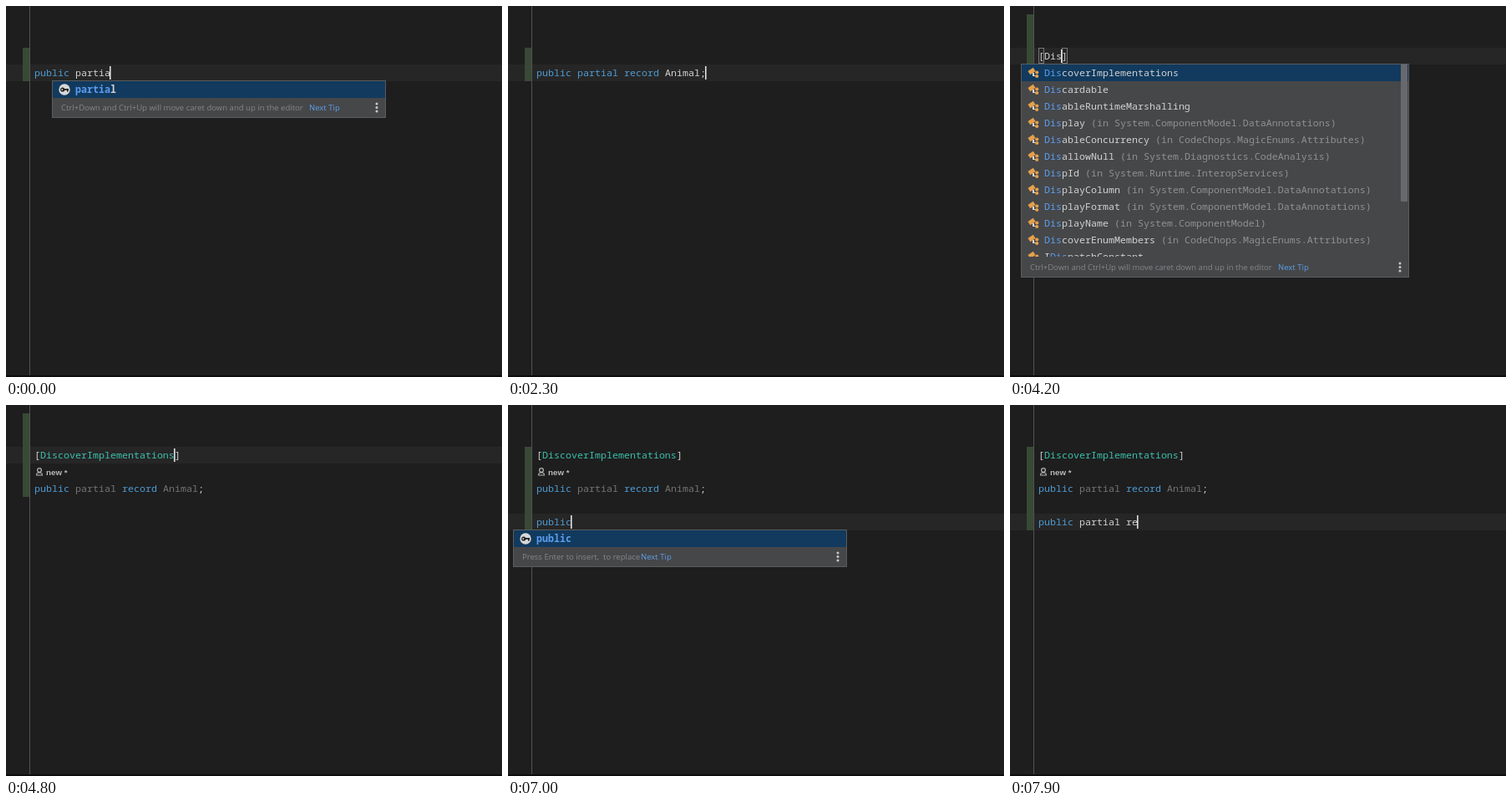
These frames come from a looping animation (594x444 px, 8 s). An HTML page with a canvas:

```html
<!DOCTYPE html>
<html lang="en">
<head>
<meta charset="utf-8">
<title>Code editor</title>
<style>
html, body { margin: 0; width: 100%; height: 100%; overflow: hidden; background: #1e1e1e; }
canvas { display: block; width: 594px; height: 444px; }
</style>
</head>
<body>
<canvas id="stage"></canvas>
<script>
const W = 594, H = 444, LOOP = 8000, LEFT = 34, CHAR = 7;
const BLUE = '#4e9bd3', WHITE = '#d2d2d2', GREY = '#747474', TEAL = '#3cc0ac', MATCH = '#5c9df0', PANEL = '#464749';
const MONO = '11.667px "Noto Sans Mono", "DejaVu Sans Mono", monospace';
const UI = '9.56px "Open Sans", "Noto Sans", sans-serif';
const MOVE_TIP = 'Ctrl+Down and Ctrl+Up will move caret down and up in the editor';
const INSERT_TIP = 'Press Enter to insert,  to replace';
const DECLARATION = [['public ', 6], ['partial ', 21], ['record ', 21], ['Animal', 99], [';', 99]];
const ATTRIBUTES = [
  'DiscoverImplementations', 'Discardable', 'DisableRuntimeMarshalling',
  'Display (in System.ComponentModel.DataAnnotations)',
  'DisableConcurrency (in CodeChops.MagicEnums.Attributes)',
  'DisallowNull (in System.Diagnostics.CodeAnalysis)',
  'DispId (in System.Runtime.InteropServices)',
  'DisplayColumn (in System.ComponentModel.DataAnnotations)',
  'DisplayFormat (in System.ComponentModel.DataAnnotations)',
  'DisplayName (in System.ComponentModel)',
  'DiscoverEnumMembers (in CodeChops.MagicEnums.Attributes)',
  'IDispatchConstant'
];

const canvas = document.getElementById('stage');
const g = canvas.getContext('2d');
const scale = window.devicePixelRatio || 1;
canvas.width = W * scale;
canvas.height = H * scale;
g.scale(scale, scale);

const colX = col => LEFT + col * CHAR;

function rect(x, y, w, h, color) {
  g.fillStyle = color;
  g.fillRect(x, y, w, h);
}

function text(str, x, y, color, font = MONO) {
  g.font = font;
  g.fillStyle = color;
  g.fillText(str, x, y);
}

function disc(x, y, r, color) {
  g.fillStyle = color;
  g.beginPath();
  g.arc(x, y, r, 0, 7);
  g.fill();
}

// Value of the last [time, value] step reached
function at(t, steps) {
  let value = steps[0][1];
  for (const [time, next] of steps) if (t >= time) value = next;
  return value;
}

function declaration(top, n, unused) {
  let col = 0;
  for (const [word, keywordAt] of DECLARATION) {
    const dim = unused && /partial|Animal/.test(word);
    const color = dim ? GREY : n >= keywordAt ? BLUE : WHITE;
    text(word.slice(0, Math.max(0, n - col)), colX(col), top + 14, color);
    col += word.length;
  }
}

function bracketBox(col, top) {
  g.strokeStyle = '#777';
  g.lineWidth = 1;
  g.strokeRect(colX(col) + .5, top + .5, CHAR - 1, 18);
}

function authorLens(top) {
  g.strokeStyle = '#b4b4b4';
  g.lineWidth = 1.2;
  g.beginPath();
  g.arc(40, top + 8, 2.4, 0, 7);
  g.moveTo(36.5, top + 14);
  g.quadraticCurveTo(36.5, top + 11.5, 38.5, top + 11);
  g.lineTo(41.5, top + 11);
  g.quadraticCurveTo(43.5, top + 11.5, 43.5, top + 14);
  g.closePath();
  g.stroke();
  text('new *', 48, top + 13.5, '#b8b8b8', 'bold 9.8px "Liberation Sans", Arial, sans-serif');
}

function keyIcon(x, y) {
  disc(x, y, 6.7, '#d8d8d8');
  disc(x - 2.3, y, 2.6, '#222');
  disc(x - 2.8, y, .9, '#d8d8d8');
  rect(x, y - 1, 5, 1.8, '#222');
  rect(x + 3, y, 1.6, 2.6, '#222');
}

function classIcon(x, y) {
  g.save();
  g.translate(x - 2, y - 2);
  g.rotate(-.6);
  rect(-3.8, -2.5, 7.6, 5, '#e5a04c');
  g.restore();
  rect(x - 1, y, 2, 4, '#d8d8d8');
  rect(x, y + 3, 3, 1, '#d8d8d8');
  disc(x + 4.2, y - .5, 2.1, '#e5a04c');
  disc(x + 4.2, y + 4, 2.1, '#e5a04c');
}

function popup({ col, top, rows, match, tip = INSERT_TIP, width = 400, keyword = true }) {
  const x = colX(col) - 28;
  const listH = Math.min(rows.length * 20, 231);
  const height = listH + 25;
  const font = keyword ? 'bold ' + MONO : MONO;
  rect(x, top, width, height, '#5b5c5e');
  rect(x + 1, top + 1, width - 2, height - 2, PANEL);
  rect(x + 1, top + 1, width - 2, 20, '#113a5e');
  g.save();
  g.beginPath();
  g.rect(x, top, width, listH);
  g.clip();
  rows.forEach((row, i) => {
    const mid = top + 11 + i * 20;
    const from = row.startsWith('ID') ? 1 : 0;
    const space = row.indexOf(' ');
    const end = space < 0 ? row.length : space;
    (keyword ? keyIcon : classIcon)(x + 15, mid);
    const part = (a, b, color) => text(row.slice(a, b), x + 28 + a * CHAR, mid + 4, color, font);
    part(0, from, WHITE);
    part(from, from + match, MATCH);
    part(from + match, end, WHITE);
    part(end, row.length, '#909090');
  });
  if (listH > 200) rect(x + width - 10, top + 1, 8, 164, '#68696c');
  g.restore();
  const base = top + height - 9;
  text(tip, x + 11, base, '#858688', UI);
  text('Next Tip', x + (tip === MOVE_TIP ? 308 : 153), base, '#5c9fe8', UI);
  for (const dy of [17, 12.5, 8]) disc(x + width - 11, top + height - dy, 1.5, '#c8c8c8');
}

function attribute(t) {
  const typed = at(t, [[0, 0], [3700, 1], [3900, 2], [4000, 3], [4500, 23]]);
  const name = ATTRIBUTES[0].slice(0, typed);
  const call = t >= 4500 && t < 4700 ? '()' : '';
  text('[', colX(0), 64, WHITE);
  text(name, colX(1), 64, t >= 4700 ? TEAL : WHITE);
  text(call + ']', colX(1 + typed), 64, WHITE);
  if (t >= 3500 && t < 4500 || t >= 4900 && t < 5100) {
    bracketBox(0, 50);
    bracketBox(1 + typed, 50);
  }
  if (call) {
    bracketBox(24, 50);
    bracketBox(25, 50);
  }
  return typed;
}

function draw(t) {
  const n1 = t < 1200 ? Math.min(13 + Math.floor(t / 100), 23)
    : at(t, [[1200, 24], [1300, 25], [1700, 28], [2300, 29]]);
  const n2 = at(t, [[0, 0], [6400, 1], [6600, 2], [6700, 3], [6800, 4], [6900, 5], [7000, 6], [7200, 7],
    [7300, 8], [7400, 9], [7500, 11], [7600, 12], [7700, 14], [7800, 16], [7900, 17]]);
  const caretTop = at(t, [[0, 70], [2700, 90], [3000, 50], [5100, 90], [5700, 110], [5900, 130]]);
  const [greenTop, greenEnd] = at(t, [[0, [50, 90]], [2700, [50, 110]], [3400, [10, 110]],
    [5700, [10, 130]], [5900, [10, 150]], [6400, [50, 150]]]);

  rect(0, 0, W, H, '#1e1e1e');
  rect(0, caretTop, W, 20, '#262626');
  rect(20, greenTop, 8, greenEnd - greenTop, '#384a35');
  rect(28, 0, 1, 442, '#525252');
  rect(0, 442, W, 2, '#0c0c0c');

  const moved = t >= 2700;
  declaration(moved ? 90 : 70, n1, t >= 2500);
  if (moved) authorLens(70);
  const typed = t >= 3400 ? attribute(t) : 0;
  declaration(130, n2, false);

  if (t >= 1000 && t < 1200) {
    g.strokeStyle = '#b5523f';
    g.lineWidth = 1;
    g.beginPath();
    for (let i = 0; i < 5; i++) g.lineTo(181 + i * 1.75, i % 2 ? 85 : 87.5);
    g.stroke();
  }

  const caretCol = at(t, [[0, n1], [3000, 0], [3400, 1 + typed], [4500, 25], [4700, 24], [4900, 25],
    [5400, 29], [5700, 0], [6400, n2]]);
  rect(colX(caretCol) - (caretCol ? 1 : 0), caretTop + 2, 1.6, 16, '#e0e0e0');

  if (t < 200) popup({ col: 7, top: 89, rows: ['partial'], match: n1 - 7, tip: MOVE_TIP });
  else if (t >= 1100 && t < 1500)
    popup({ col: 22, top: 89, rows: ['Animal'], match: n1 - 22, keyword: false });
  else if (t >= 3800 && t < 4500)
    popup({ col: 1, top: 69, rows: ATTRIBUTES, match: typed, tip: MOVE_TIP, width: 465, keyword: false });
  else if (t >= 6500 && t < 6600)
    popup({ col: 0, top: 149, rows: ['public', 'partial', 'private'], match: 1, width: 465 });
  else if (t >= 6600 && t < 7200)
    popup({ col: 0, top: 149, rows: ['public'], match: n2 });
  else if (t >= 7400 && t < 7800)
    popup({ col: 7, top: 149, rows: ['partial'], match: n2 - 7, width: n2 < 12 ? 477 : 400 });
}

function frame() {
  draw(performance.now() % LOOP);
  requestAnimationFrame(frame);
}
frame();
</script>
</body>
</html>
```
